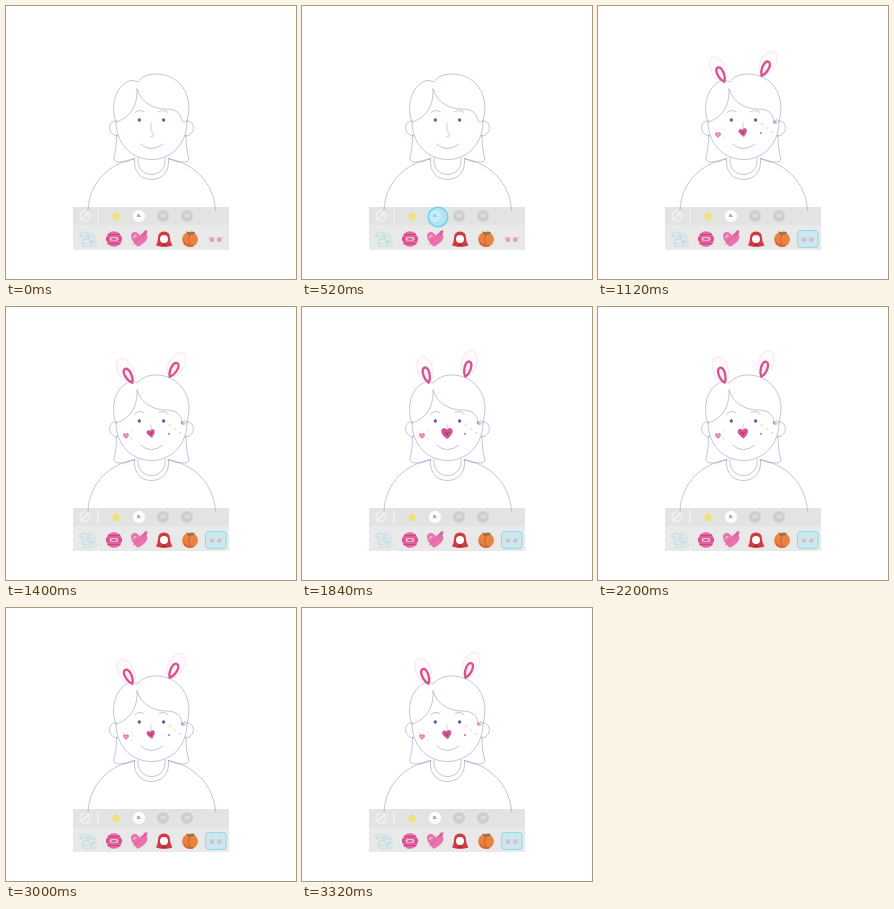
Animation of 290 by 273 pixels, one loop 3.36 s. Source, as an HTML page:

```html
<!DOCTYPE html>
<html lang="en">
<head>
<meta charset="utf-8">
<style>
html, body { margin: 0; width: 100%; height: 100%; overflow: hidden; background: #fff; }
svg { display: block; }
text { font: 700 3.6px Inter, Arial, sans-serif; text-anchor: middle; }
.line { fill: none; stroke: #868db4; stroke-width: .5; stroke-linecap: round; stroke-linejoin: round; }
</style>
</head>
<body>
<svg width="290" height="273" viewBox="0 0 290 273">
  <defs>
    <path id="heart" d="M0 4.2C-6-.2-5-4.2-2.4-4.2Q-.7-4.2 0-2.4Q.7-4.2 2.4-4.2C5-4.2 6-.2 0 4.2Z"/>
    <g id="ear">
      <ellipse cy="-15.5" rx="7.6" ry="13" fill="#fffbfd" stroke="#fae8f1" stroke-width="1.2"/>
      <path d="M0-1.500C-4-6-4.500-17 0-17S4-6 0-1.500Z" fill="#fdf1f6" stroke="#d9508f" stroke-width="2.300"/>
    </g>
  </defs>

  <!-- sticker tray -->
  <path fill="#e2e4e3" d="M67 201h156v18H67z"/>
  <path fill="#e8e9e8" d="M67 219h156v25H67z"/>
  <g fill="none" stroke="#f5f6f6" stroke-width="1.2">
    <circle cx="79" cy="210" r="5"/>
    <path d="M75.8 213.2l6.4-6.4M92 204v12"/>
  </g>
  <path id="star" fill="#f3e07c"/>
  <circle cx="133" cy="210" r="6" fill="#fff"/>
  <g fill="#cdcfce"><circle cx="157" cy="210" r="6"/><circle cx="181" cy="210" r="6"/></g>
  <text x="133" y="211.4" fill="#777c82">AL</text>
  <g fill="#ecedec"><text x="157" y="211.4">AR</text><text x="181" y="211.4">AB</text></g>

  <!-- crystals -->
  <g fill="#e0eaeb" stroke="#bfd9de" stroke-width=".7">
    <path d="M73 229l3-3 6 1 2 4-5 3zM81 228l4-2 4 4-1 6-5-2zM76 235l5-3 5 3-2 6-7-1zM84 236l4-2 3 4-4 3z"/>
    <path d="M73 229l6 1 4 1M82 228l4 3 3-1M75 236l5 2 5-2"/>
  </g>
  <!-- doughnut -->
  <circle cx="108" cy="233" r="7.800" fill="#e968a5"/>
  <path d="M102 228.500h12M101.500 237.500h13" stroke="#c9488a" stroke-width="1.300"/>
  <rect x="99.800" y="230.500" width="16.400" height="4.800" rx="2.200" fill="#d9528f"/>
  <rect x="103.500" y="231" width="9" height="3.800" rx="1.900" fill="#f6c3d9"/>
  <path d="M105.500 233h5" stroke="#a94375" stroke-width="1.300"/>
  <!-- arrowed heart -->
  <use href="#heart" transform="translate(132.800 233.800) rotate(8) scale(1.850 1.700)" fill="#e772ad"/>
  <path d="M127.500 232q1-3 3-2.500" fill="none" stroke="#f7bbd8" stroke-width="1.500"/>
  <path d="M127 238.500l11-10M137 228.500l1-3 3-1-.5 3-2.500 2z" fill="#db5f99" stroke="#db5f99" stroke-width=".7"/>
  <!-- hood -->
  <path d="M150 239.500q2-4 2-7.500 0-6.500 6-6.500t6 6.500q0 3.500 2.500 7.500-8 2.500-16.500 0z" fill="#d03a42"/>
  <circle cx="158" cy="233" r="4" fill="#fff"/>
  <path d="M154.500 240.300l3.500-3 3.500 3z" fill="#a3313b"/>
  <!-- peach -->
  <ellipse cx="184" cy="233.300" rx="8" ry="7.600" fill="#e8843f"/>
  <path d="M178 236q3 5 9 3.500" fill="none" stroke="#d2643a" stroke-width="2"/>
  <path d="M184 228q-3 5 0 11" fill="none" stroke="#cc5f31"/>
  <path d="M182 228q3-4 7-1.500-2 3.500-7 1.500z" fill="#8a7a4c"/>
  <path d="M183 228.500l-2-3" stroke="#7d5238"/>

  <!-- face sticker thumbnail -->
  <g fill="#e3afc6">
    <ellipse cx="206" cy="233.500" rx="2.500" ry="2.600"/><ellipse cx="213.300" cy="233.500" rx="2.500" ry="2.600"/>
    <circle cx="203" cy="232" r=".8"/><circle cx="216" cy="232" r=".8"/>
  </g>
  <g fill="#c48aa5"><circle cx="206.300" cy="234" r=".9"/><circle cx="213" cy="234" r=".9"/></g>
  <rect id="selected" x="199.600" y="224.600" width="20.400" height="16.800" rx="3"
    fill="#b5e6f2" fill-opacity=".5" stroke="#8bd9ef"/>

  <!-- person -->
  <g class="line">
    <path d="M82 204C83 177 103 157 129 152.500M162 152.500C188 157 208 177 209.500 204"/>
    <path d="M128.500 152.500V157C129 167 136 173.500 145.500 173.500S162 167 162.500 157V152.500M132 152V156C132.500 163 138 168.500 145.500 168.500S158.500 163 159 156V152"/>
    <path d="M110.500 129Q110.500 143 108 151Q107 155 112 156Q120 157 128 153M180 129Q180 143 182.500 151Q184 155 179 156Q171 157 163 153"/>
    <path d="M110 115C101 114 101 130 112 130M181 115C190 114 190 130 179 130"/>
    <path d="M110 116C110 137 125 153.500 145.500 153.500S181 137 181 116"/>
    <path d="M110 116C106 107 107 93 112 85C117 76 126 72 131.500 76C136 70 143 68 150 68C169 68 182 82 183 100Q183 109 181 116"/>
    <path d="M131 83C132 101 123 112 110 116M131 83C135 97 148 103 160 103C171 103 175 108 176 115Q179 118 181 114"/>
    <path d="M129 106.500Q133 103 138 105.500M153 105.500Q158 103 162 106.500M134.500 138Q145 147.500 157 138"/>
    <path d="M145 117V124Q147 128 147.300 130Q146.500 131.500 144.500 130.800" stroke="#8aa5c8"/>
  </g>
  <g fill="#56648f"><circle cx="133.300" cy="114" r="1.700"/><circle cx="157.600" cy="114" r="1.700"/></g>

  <!-- face stickers -->
  <g id="mask">
    <use id="leftEar" href="#ear"/>
    <use id="rightEar" href="#ear"/>
    <g id="nose">
      <use href="#heart" fill="#dd4f90" stroke="#c04a86" stroke-width=".6"/>
      <path d="M-1.500-1.500L0 1.300 1.500-1.500" fill="none" stroke="#8f3a76" stroke-width=".8"/>
    </g>
    <use href="#heart" transform="translate(120 129) scale(.55)" fill="#f0a0c1" stroke="#d9508f" stroke-width="1.500"/>
    <path d="M175 117l4-3.500M175.500 114.500l.5 2.500 2.500.3" fill="none" stroke="#cf5f92" stroke-width=".8"/>
    <circle cx="163" cy="127" r="1.100" fill="#df6fa7"/>
    <g fill="#f6ecd0">
      <circle cx="126" cy="124" r="1"/><circle cx="164" cy="118" r="1.700"/><circle cx="169" cy="122" r="1.400"/>
    </g>
    <g fill="#e6eddf"><circle cx="126" cy="132" r=".9"/><circle cx="174" cy="126" r="1.300"/></g>
    <circle cx="117" cy="125" r=".8" fill="#f7d5e3"/>
  </g>

  <circle id="touch" r="9.7" fill="#8fe2f8" fill-opacity=".55" stroke="#60d0f2" stroke-opacity=".85" stroke-width="1.6"/>
</svg>
<script>
const $ = id => document.getElementById(id);
const LOOP = 3360, STEP = 40, TOUCH = 520, PICK = 1080;
// [time, outward lean of the ears]
const sway = [[1080, .75], [1320, 1], [1940, 0], [2740, 1], [3900, 0]];

const starPoints = Array.from({ length: 10 }, (_, i) => {
  const a = i * Math.PI / 5, r = i % 2 ? 2.9 : 5.6;
  return `${110 + r * Math.sin(a)} ${210.5 - r * Math.cos(a)}`;
});
$('star').setAttribute('d', `M${starPoints.join('L')}Z`);

function lean(t) {
  const i = Math.max(1, sway.findIndex(k => k[0] > t));
  const [t0, a] = sway[i - 1], [t1, b] = sway[i];
  const p = Math.max(0, (t - t0) / (t1 - t0));
  return a + (b - a) * (1 - Math.cos(Math.PI * p)) / 2;
}

const show = (id, on) => $(id).setAttribute('visibility', on ? 'visible' : 'hidden');
const place = (id, x, y, angle = 0, scale = 1) =>
  $(id).setAttribute('transform', `translate(${x} ${y}) rotate(${angle}) scale(${scale})`);

function draw(t) {
  const picked = t >= PICK;
  show('touch', t >= TOUCH && !picked);
  show('selected', picked);
  show('mask', picked);

  const p = (t - TOUCH) / 520;
  place('touch', 136 + 64 * p, 211 + 18.5 * p);

  const out = lean(t);
  place('leftEar', 127, 77, -14 - 15 * out);
  place('rightEar', 163, 71, 14 + 16 * out);
  place('nose', 145, 126.5, -14 * out, .85 + .4 * (1 - out) ** 2);
}

const start = performance.now();
function tick() {
  const t = (performance.now() - start) % LOOP;
  draw(Math.floor(t / STEP) * STEP);
  requestAnimationFrame(tick);
}
tick();
</script>
</body>
</html>
```
